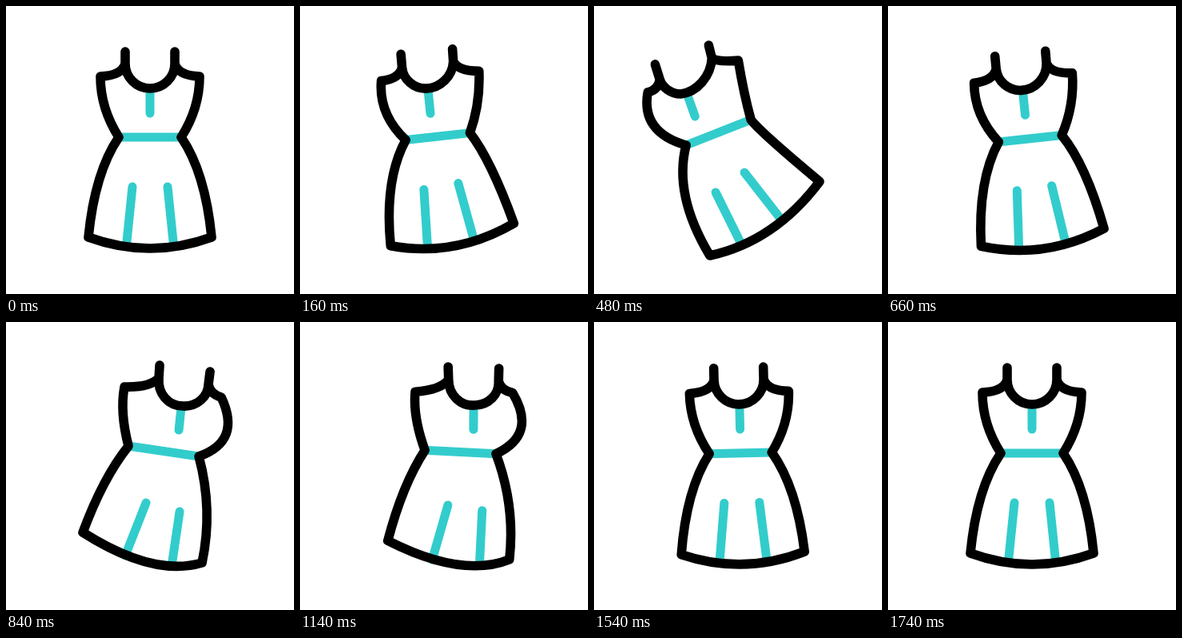
Recreate the animation shown at these times as an HTML page. Size 360x360 px, loop 2.4 s.

```html
<!DOCTYPE html>
<html lang="en">
<head>
<meta charset="utf-8">
<title>Swinging dress</title>
<style>
  html, body { margin: 0; width: 100%; height: 100%; overflow: hidden; background: #fff; }
  svg { display: block; width: 100%; height: 100%; }
  path { fill: none; stroke-linecap: round; stroke-linejoin: round; }
  #trim { stroke: #33cccc; stroke-width: 11; }
  #outline { stroke: #000; stroke-width: 11.6; }
</style>
</head>
<body>
<svg viewBox="0 0 360 360">
  <g id="dress"><path id="trim"/><path id="outline"/></g>
</svg>
<script>
const LOOP = 2400;

// time, x, y, angle, bend (1 = skirt trails right, -1 = skirt trails left)
const KEYS = [
  [0, 180, 57, 0, 0],
  [160, 158.5, 57, -6, .3],
  [470, 109.5, 61, -20.6, .99],
  [510, 113, 60.9, -19.7, 1],
  [840, 223.5, 58, 8.1, -1],
  [950, 227, 58, 8, -1.04],
  [1140, 217, 57, 2.6, -1],
  [1290, 194, 56.7, -4.1, -.4],
  [1360, 183.5, 56.5, -4.5, -.13],
  [1600, 180.3, 57, -.6, 0],
  [1740, 180, 57, 0, 0]
];

// Side points: strap tip, strap joint, neck corner, armhole, shoulder, side,
// waist, skirt, hem, dart top, dart end. Middle: neck, hem, seam top, seam end.
const restSide = [[149, 57], [149, 72], [149, 103], [145, 87], [118, 88], [118, 128],
  [141, 164], [111, 208], [103, 289], [158, 226], [150.5, 299]];
const mirror = ([x, y]) => [360 - x, y];

const rest = localPose(180, 57, 0,
  restSide, restSide.map(mirror),
  [[180, 103], [180, 317], [180, 105], [180, 134]]);

const bentRight = localPose(109.5, 61, -20.6,
  [[76, 73], [82, 92], [87, 110], [80, 105], [67, 108], [58, 158],
    [115, 174], [99, 236], [145, 312], [152, 233], [184, 297]],
  [[143, 49], [147, 65], [145, 106], [153, 70], [180, 68], [187, 110],
    [196, 142], [206, 156], [282, 219], [188, 208], [235, 268]],
  [[108, 110], [226, 294], [116, 110], [126, 138]]);

const bentLeft = localPose(223.5, 58, 8.1,
  [[192, 54], [191, 70], [188, 105], [180, 82], [148, 81], [142, 112],
    [153, 155], [121, 195], [96, 263], [175, 226], [149, 292]],
  [[255, 62], [253, 78], [252, 107], [255, 90], [269, 94], [295, 149],
    [241, 168], [259, 235], [245, 301], [217, 237], [207, 305]],
  [[221, 105], [184, 319], [219, 106], [216, 135]]);

// Stage points to coordinates relative to the strap line.
function localPose(x, y, angle, ...groups) {
  const a = angle * Math.PI / 180, c = Math.cos(a), s = Math.sin(a);
  return groups.map(group => group.map(([px, py]) => {
    const dx = px - x, dy = py - y;
    return [dx * c + dy * s, dy * c - dx * s];
  }));
}

const mix = (p, q, k) => p.map((v, i) => v + (q[i] - v) * k);

function bend(amount) {
  const goal = amount < 0 ? bentLeft : bentRight;
  return rest.map((group, g) => group.map((p, i) => mix(p, goal[g][i], Math.abs(amount))));
}

const rate = (i, ch) => (KEYS[i + 1][ch] - KEYS[i][ch]) / (KEYS[i + 1][0] - KEYS[i][0]);

// Slope at a key: flat at turning points, harmonic mean elsewhere.
function slope(i, ch) {
  if (i === 0 || i === KEYS.length - 1) return 0;
  const a = rate(i - 1, ch), b = rate(i, ch);
  return a * b > 0 ? 2 * a * b / (a + b) : 0;
}

function sample(t, ch) {
  const last = KEYS.length - 1;
  if (t >= KEYS[last][0]) return KEYS[last][ch];
  const i = KEYS.findIndex(k => k[0] > t) - 1;
  const span = KEYS[i + 1][0] - KEYS[i][0];
  const u = (t - KEYS[i][0]) / span, v = 1 - u;
  return KEYS[i][ch] * (1 + 2 * u) * v * v + KEYS[i + 1][ch] * u * u * (3 - 2 * u)
    + span * u * v * (slope(i, ch) * v - slope(i + 1, ch) * u);
}

const at = p => p.map(v => v.toFixed(2)).join(" ");
const line = (p, q) => `M${at(p)}L${at(q)}`;
const quad = (c, p) => `Q${at(c)} ${at(p)}`;
const round = (p, corner, q) =>
  `C${at(mix(p, corner, .552))} ${at(mix(q, corner, .552))} ${at(q)}`;

const [dress, trim, outline] = ["dress", "trim", "outline"].map(id => document.getElementById(id));

function draw(t) {
  const [x, y, angle, amount] = [1, 2, 3, 4].map(ch => sample(t, ch));
  const [left, right, [neck, hemCurve, seamTop, seamEnd]] = bend(amount);
  const [tipL, jointL, cornerL, armL, shoulderL, sideL, waistL, skirtL, hemL, dartL, dartEndL] = left;
  const [tipR, jointR, cornerR, armR, shoulderR, sideR, waistR, skirtR, hemR, dartR, dartEndR] = right;

  dress.setAttribute("transform", `translate(${x} ${y}) rotate(${angle})`);
  trim.setAttribute("d", line(seamTop, seamEnd) + line(waistL, waistR)
    + line(dartL, dartEndL) + line(dartR, dartEndR));
  outline.setAttribute("d", line(tipL, jointL)
    + round(jointL, cornerL, neck) + round(neck, cornerR, jointR) + `L${at(tipR)}`
    + `M${at(jointR)}` + quad(armR, shoulderR) + quad(sideR, waistR) + quad(skirtR, hemR)
    + quad(hemCurve, hemL) + quad(skirtL, waistL) + quad(sideL, shoulderL) + quad(armL, jointL));
}

function tick() {
  draw(performance.now() % LOOP);
  requestAnimationFrame(tick);
}
tick();
</script>
</body>
</html>
```
